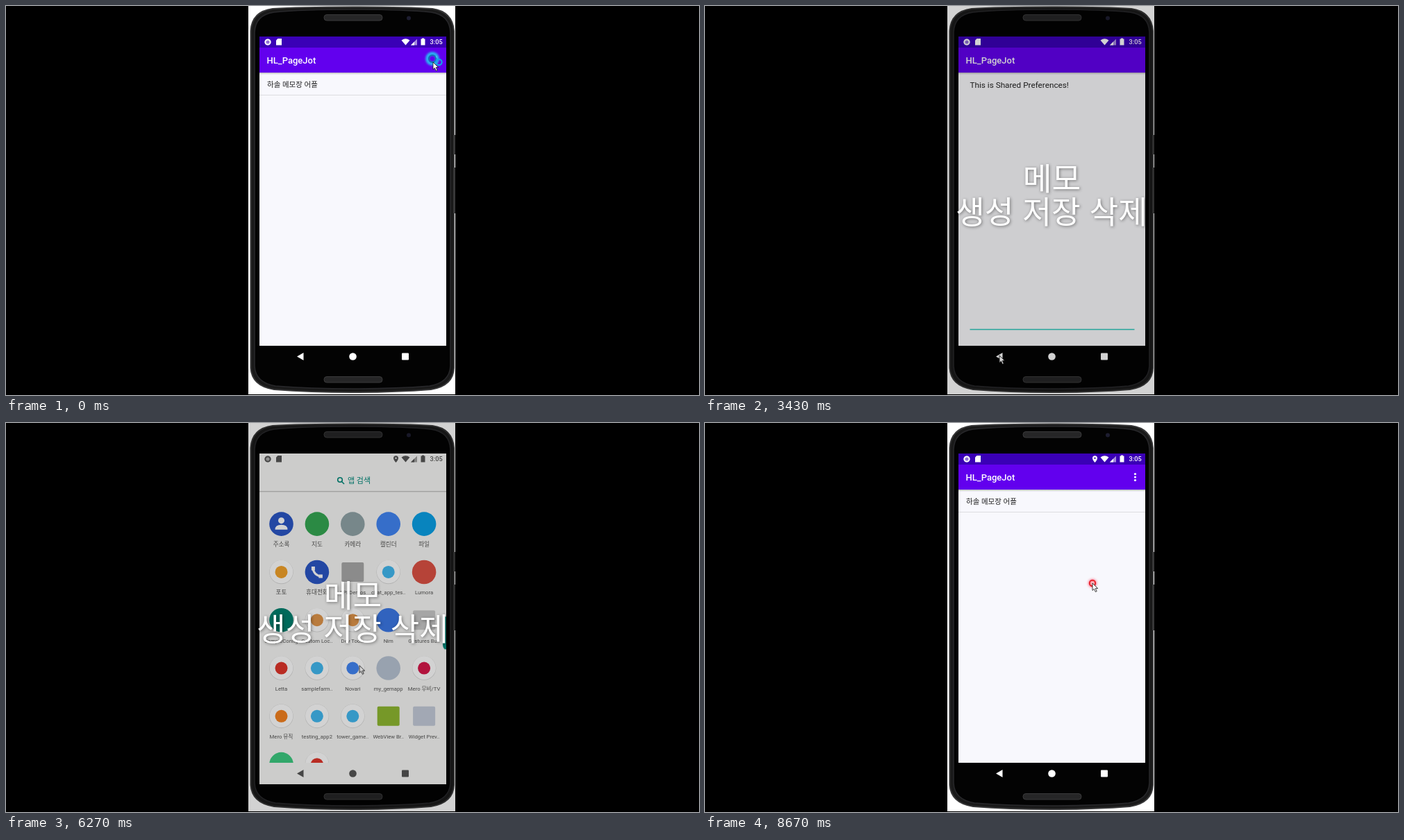
Recreate the animation shown at these times as an HTML page. Size 998 by 561 pixels, loop 8710 ms.

```html
<!DOCTYPE html>
<html lang="ko">
<head>
<meta charset="utf-8">
<title>Memo app demo</title>
<style>
  html, body { margin: 0; width: 100%; height: 100%; overflow: hidden; background: #000; }
  svg { display: block; width: 998px; height: 561px; }
  text { font-family: Roboto, "Noto Sans CJK KR", "Noto Sans CJK", sans-serif; white-space: pre; }
  .mid { text-anchor: middle; }
  .row { font-size: 10.5px; fill: #222; }
  .label { font-size: 7.7px; fill: #555; text-anchor: middle; }
  .label.ko { font-size: 8.6px; }
  .key { font-size: 18px; fill: #37474f; text-anchor: middle; }
  .hint { font-size: 7px; fill: #65737a; text-anchor: middle; }
  .word { font-size: 12px; fill: #5f6b70; text-anchor: middle; }
  .line { fill: none; stroke: currentColor; }
  #title { font-size: 45.4px; fill: #fff; text-anchor: middle; filter: drop-shadow(1px 1px 2px rgba(0,0,0,.45)); }
  #title text { font-family: "Noto Sans CJK KR", "Noto Sans CJK", sans-serif; font-weight: 300; }
  #ink { color: #fff; fill: currentColor; }
</style>
</head>
<body>
<svg viewBox="0 0 998 561">
  <defs>
    <clipPath id="screen"><rect x="365" y="44" width="269" height="477"/></clipPath>
    <clipPath id="below"><rect x="365" y="99" width="269" height="391"/></clipPath>
    <linearGradient id="sky" x1="0" y1="0" x2="0" y2="1">
      <stop offset="0" stop-color="#d393be"/>
      <stop offset=".25" stop-color="#e39bba"/>
      <stop offset=".45" stop-color="#d67ba6"/>
      <stop offset=".58" stop-color="#bd5a91"/>
      <stop offset=".69" stop-color="#8d3675"/>
      <stop offset=".79" stop-color="#562463"/>
      <stop offset="1" stop-color="#351d52"/>
    </linearGradient>
    <linearGradient id="drop" x1="0" y1="0" x2="0" y2="1">
      <stop offset="0" stop-opacity=".25"/>
      <stop offset="1" stop-opacity="0"/>
    </linearGradient>
    <filter id="blur" x="-1" y="-1" width="3" height="3"><feGaussianBlur stdDeviation="1.4"/></filter>
  </defs>

  <!-- phone -->
  <rect x="349" width="298" height="560" fill="#fff"/>
  <path d="M645 186h2v28h-2zM645 233h2v66h-2z" fill="#3a3a3a"/>
  <path d="M352.500 36Q354 8 384 4Q420 1.500 499 1.500T614 4Q643 8 645 36V522Q644 548 612 553Q560 557 499 557T386 553Q354 548 352.500 522Z" fill="#191919" stroke="#363637" stroke-width="2"/>
  <path d="M358 38Q359 13 386 9Q425 5 499 5T612 9Q639 13 640 38V519Q639 543 610 548Q560 552 499 552T388 548Q359 543 358 519Z" fill="#030303" stroke="#28282b" stroke-width="1.500"/>
  <g fill="#262627" stroke="#3a3a3b">
    <rect x="458" y="12.500" width="84" height="8.500" rx="4"/>
    <rect x="458" y="534.500" width="84" height="8.500" rx="4"/>
  </g>
  <circle cx="580" cy="17.500" r="3" fill="#1d1d30"/>

  <g clip-path="url(#screen)">
    <!-- list -->
    <rect x="365" y="44" width="269" height="446" fill="#f8f8fd"/>
    <rect x="365" y="44" width="269" height="16" fill="#3a00b6"/>
    <rect x="365" y="60" width="269" height="36" fill="#6200ee"/>
    <rect x="365" y="96" width="269" height="3" fill="url(#drop)"/>
    <text x="375.500" y="83" font-size="13" font-weight="500" fill="#fff">HL_PageJot</text>
    <g fill="#fff"><circle cx="619.500" cy="73.500" r="1.600"/><circle cx="619.500" cy="78" r="1.600"/><circle cx="619.500" cy="82.500" r="1.600"/></g>
    <text class="row" x="376" y="116.500">하솔 메모장 어플</text>
    <path d="M365 128.500h269" stroke="#dcdce0"/>
    <g id="second">
      <text class="row" x="376" y="149">This is Shared Preferences!</text>
      <path d="M365 160.500h269" stroke="#dcdce0"/>
    </g>

    <!-- editor -->
    <g id="editor">
      <rect x="600" y="62" width="34" height="33" fill="#6200ee"/>
      <rect x="365" y="99" width="269" height="391" fill="#fafafc"/>
      <path id="underline" d="M381.500 466.500H618.500" stroke="#2cc8ba" stroke-width="1.500"/>
      <text id="note" x="381.500" y="117.500" font-size="11.750" fill="#222"></text>
      <rect id="caret" y="105" width="1.600" height="16" fill="#12b5a6"/>
    </g>

    <!-- home -->
    <g id="home">
      <rect x="365" y="44" width="269" height="477" fill="url(#sky)"/>
      <path d="M365 434Q402 424 432 427Q462 431 480 437L634 446V521H365Z" fill="#2f1a50"/>
      <path d="M365 444Q430 438 500 441T634 436V521H365Z" fill="#352052"/>
      <rect x="365" y="432" width="269" height="89" fill="#fff" opacity=".06"/>
      <g opacity=".78">
        <rect x="371" y="83" width="51" height="37" rx="18.500" fill="#fff"/>
        <circle cx="396.500" cy="102" r="8" fill="#4285f4"/>
        <g fill="#fff" text-anchor="end">
          <text x="621" y="103.500" font-size="23" font-weight="300" opacity=".65">7월 2일</text>
          <text x="621" y="120" font-size="8" opacity=".35">2020년 목요일</text>
        </g>
        <g id="dock"></g>
        <text class="label ko" x="396.500" y="404" style="fill:#fff">지도</text>
      </g>
      <path d="M496 424l3.500-3.500 3.500 3.500" fill="none" stroke="#fff" stroke-width="1.300"/>
    </g>

    <!-- app drawer -->
    <g id="drawer">
      <rect x="365" y="44" width="269" height="477" fill="#f8f8f6"/>
      <g clip-path="url(#below)"><g id="apps"></g></g>
      <rect x="365" y="98" width="269" height="2.500" fill="url(#drop)"/>
      <g fill="none" stroke="#00897b" stroke-width="1.600"><circle cx="481" cy="82" r="3.300"/><path d="M483.500 84.500l3.500 3.500"/></g>
      <text x="492" y="87" font-size="11" fill="#00897b">앱 검색</text>
      <path id="thumb" d="M634 443h-2q-3 2-3 8v32q0 5 3 7h2z" fill="#00897b"/>
    </g>

    <rect id="ripple" x="540" y="490" width="70" height="31" rx="15.500" fill="#fff"/>

    <!-- status and navigation icons -->
    <g id="ink">
      <circle class="line" cx="377" cy="52" r="3.600" stroke-width="2"/>
      <circle cx="377" cy="52" r="4.500" opacity=".45"/>
      <path d="M391.500 47h5.500v9.500h-8v-7z"/>
      <path id="pin" d="M561.500 57q-3.500-4-3.500-6.300a3.500 3.500 0 0 1 7 0q0 2.300-3.500 6.300zm0-7.600a1.200 1.200 0 1 0 .01 0z" fill-rule="evenodd"/>
      <path d="M569.500 49.500q6-4.500 12 0l-6 7z"/>
      <path d="M592 47.500v9h-9z" opacity=".55"/><path d="M588 51.500v5h-5z"/>
      <path d="M599 46.500h3v1h1.500v9h-6v-9h1.500z"/>
      <text x="610.500" y="55.300" font-size="9.200" font-weight="500">3:05</text>
      <path d="M428.500 500v11l-9.500-5.500z"/>
      <circle cx="499.500" cy="505.500" r="5.300"/>
      <rect x="570" y="500.500" width="10" height="10" rx="1"/>
    </g>

    <!-- keyboard -->
    <g id="keyboard">
      <rect x="417" y="498" width="14" height="15"/>
      <path d="M418.500 501h11l-5.500 9.500z" fill="#fff"/>
      <rect x="608" y="501" width="13" height="9" rx="1" fill="#fff"/>
      <path d="M610 503.500h9M610 505.500h9" stroke="#000" stroke-dasharray="1 1"/><path d="M612 508h5" stroke="#000"/>
      <rect x="365" y="305" width="269" height="185" fill="#eceff1"/>
      <rect x="365" y="305" width="269" height="28" fill="#e2e6e9"/>
      <path d="M460.500 313v15M538.500 313v15" stroke="#cbd1d4"/>
      <circle cx="372" cy="320.500" r="7" fill="#f7f8f9"/>
      <g color="#546168">
        <path class="line" d="M370.500 317l3.500 3.500-3.500 3.500" stroke-width="1.300"/>
        <rect x="619.300" y="315" width="3.600" height="7" rx="1.800" fill="currentColor"/>
        <path class="line" d="M617.300 320q0 4 3.800 4t3.800-4M621 324v3"/>
        <path d="M386 423l7.500 7.500h-4v5h-7v-5h-4zM383 438h6v1.500h-6z" fill="currentColor"/>
        <path d="M604.500 429.500l4.500-6h11v12h-11z" fill="currentColor"/>
        <path d="M611 426.500l6 6m0-6l-6 6" stroke="#eceff1" stroke-width="1.300"/>
        <circle class="line" cx="446" cy="467" r="6" stroke-width="1.300"/>
        <path class="line" d="M443 469q3 3 6 0M443.500 464.500v2M448.500 464.500v2" stroke-width="1.200"/>
      </g>
      <text class="key" x="386" y="471.500" style="font-size:11.500px">?123</text>
      <text class="key" x="419" y="471">,</text>
      <text class="key" x="579" y="471">.</text>
      <rect x="466" y="459" width="93.500" height="17" rx="1" fill="#c2c8cb"/>
      <text class="mid" x="512.500" y="470.500" font-size="8.500" fill="#5f6b70">English</text>
      <circle cx="612.500" cy="467.500" r="11.500" fill="#2fb5a0"/>
      <path d="M618 463.500v4.500h-10.500m3-3l-3 3 3 3" fill="none" stroke="#fff" stroke-width="1.400"/>
    </g>
  </g>

  <!-- pointer, tip at 0,0 -->
  <g id="pointer">
    <g id="press">
      <circle r="7.500" fill="none" stroke="#22c3f2" stroke-width="4.500" filter="url(#blur)"/>
      <circle r="5" fill="none" stroke="#1273b8" stroke-width="2"/>
    </g>
    <g id="release">
      <circle r="4.600" fill="#f33" fill-opacity=".25" stroke="#f03" stroke-opacity=".35" stroke-width="4" filter="url(#blur)"/>
      <circle r="4.200" fill="none" stroke="#e8242c" stroke-width="2"/>
    </g>
    <circle id="busy" cx="8.500" cy="0" r="4.200" fill="none" stroke="#14a0e8" stroke-width="2.200"/>
    <path d="M0 0v10.500l2.400-2.200 1.900 4.200 1.900-.8-1.900-4.100h3.400z" fill="#fff" stroke="#111" stroke-width=".8"/>
  </g>

  <rect id="shade" width="998" height="561" opacity="0"/>
  <g id="title" opacity="0">
    <text x="499.500" y="266">메모</text>
    <text x="499" y="314">생성 저장 삭제</text>
  </g>
</svg>

<script>
const LOOP = 8710;
const $ = id => document.getElementById(id);

// Keys are [ms, properties]; the first and last hold to the ends of the loop.
function play(id, keys, easing = 'linear') {
  const all = [[0, keys[0][1]], ...keys, [LOOP, keys[keys.length - 1][1]]];
  $(id).animate(all.map(([ms, props]) => ({ ...props, offset: ms / LOOP, easing })),
    { duration: LOOP, iterations: Infinity });
}

const fade = (id, keys) => play(id, keys.map(([ms, opacity]) => [ms, { opacity }]));
const show = (id, from, to) => fade(id, [[from, 0], [from, 1], [to, 1], [to, 0]]);
const move = (id, keys, easing) =>
  play(id, keys.map(([ms, x, y]) => [ms, { transform: `translate(${x}px, ${y}px)` }]), easing);

// Keyboard letters
const text = (cls, x, y, s) => `<text class="${cls}" x="${x}" y="${y}">${s}</text>`;
const keyRow = (letters, x, y) => [...letters].map((c, i) => text('key', x + i * 26.6, y, c)).join('');
$('keyboard').insertAdjacentHTML('beforeend',
  keyRow('qwertyuiop', 379.5, 360.5) + keyRow('asdfghjkl', 393, 398) + keyRow('zxcvbnm', 419.5, 436) +
  [...'1234567890'].map((c, i) => text('hint', 389 + i * 26.6, 346.5, c)).join('') +
  text('word', 424, 325, 'a') + text('word', 498.5, 325, 'with') + text('word', 573, 325, 'this'));

// App icons
const shapes = {
  disc: c => `<circle r="17.300" fill="${c}"/>`,
  dot: c => `<circle r="17.300" fill="#d8d8d8"/><circle r="16.800" cy="-.4" fill="#fff"/><circle r="9" fill="${c}"/>`,
  box: c => `<rect x="-16" y="-14" width="32" height="28" rx="2" fill="${c}"/>`,
  phone: c => shapes.disc(c) + '<path d="M-6-6.500Q-5 5 6.500 6.500" fill="none" stroke="#fff" stroke-width="3"/><path d="M-8-8h5v5.500h-5zM2.500 3.500H8v5H2.500z" fill="#fff"/>',
  chat: c => shapes.disc(c) + `<path d="M-11-7H10V7H-7V-3z" fill="#fff"/><path d="M-4-3H7M-4 0H7M-4 3H4" stroke="${c}"/>`,
  person: c => shapes.disc(c) + '<circle cy="-5" r="4.500" fill="#fff"/><path d="M-9 8q0-7 9-7t9 7z" fill="#fff"/>'
};
const icon = (x, y, kind, c) => `<g transform="translate(${x} ${y})">${shapes[kind](c)}</g>`;
const blue = '#2a56c6', sky = '#42b8f0', red = '#e0352b', gold = '#f3a32b';

$('dock').innerHTML = icon(396.5, 371, 'disc', '#34a853') + icon(396.5, 464, 'phone', blue) +
  icon(448, 464, 'chat', blue) + icon(499.5, 464, 'dot', red) + icon(551, 464, 'disc', '#dd5144');

const apps = [
  ['주소록', 'person', blue], ['지도', 'disc', '#34a853'], ['카메라', 'disc', '#90a4a8'],
  ['캘린더', 'disc', '#4285f4'], ['파일', 'disc', '#0aa0e6'],
  ['포토', 'dot', gold], ['휴대전화', 'phone', blue], ['API Demos', 'box', '#a9a9a9'],
  ['chat_app_tes..', 'dot', sky], ['Lumora', 'disc', '#dd5144'],
  ['SampleConfig', 'disc', '#00806f'], ['Custom Loc..', 'dot', '#e0954a'], ['Dev Tools', 'dot', '#e0954a'],
  ['Nim', 'disc', '#3b78e7'], ['Gestures Bu..', 'box', '#c9c9c9'],
  ['Letta', 'dot', red], ['samplefarm..', 'dot', sky], ['Novari', 'dot', '#4285f4'],
  ['my_gemapp', 'disc', '#b9c4d4'], ['Mero 무비/TV', 'dot', '#d8174a'],
  ['Mero 뮤직', 'dot', '#f58220'], ['testing_app2', 'dot', sky], ['tower_game..', 'dot', sky],
  ['WebView Br..', 'box', '#8fb831'], ['Widget Prev..', 'box', '#c4ccda'],
  ['HL_PageJot', 'disc', '#3ccb80'], ['ClipDen', 'dot', red]
];
$('apps').innerHTML = apps.map(([name, kind, c], i) => {
  const x = 396.5 + i % 5 * 51.4, y = 101 + Math.floor(i / 5) * 69.3;
  return icon(x, y, kind, c) + text(/^[가-힣]/.test(name) ? 'label ko' : 'label', x, y + 32.3, name);
}).join('');

// Screens
show('editor', 600, 3550);
show('keyboard', 1200, 3250);
fade('underline', [[1200, 1], [1200, 0], [3250, 0], [3250, 1]]);
show('second', 3550, 8200);
show('home', 4850, 6000);
show('drawer', 5700, 7150);
fade('pin', [[4850, 0], [4850, 1]]);
move('drawer', [[5700, 0, 477], [5980, 0, 0]], 'ease-out');
move('apps', [[6150, 0, 90], [6500, 0, 0]], 'ease-out');
move('thumb', [[6150, 0, -330], [6500, 0, 0]], 'ease-out');
play('ink', [[5850, { color: '#fff' }], [5850, { color: '#555' }], [7150, { color: '#555' }], [7150, { color: '#fff' }]]);
fade('ripple', [[4340, 0], [4420, .2], [4560, .2], [4750, 0]]);

// Pointer
move('pointer', [[0, 615, 81], [250, 619, 81], [550, 529, 75], [2850, 529, 75], [3150, 424, 504], [3600, 424, 504],
  [4300, 552, 507], [4650, 552, 507], [5300, 509, 451], [5700, 509, 451], [6000, 509, 300], [6150, 509, 380],
  [6450, 509, 290], [6800, 407, 460], [7150, 407, 460], [7550, 450, 146], [7950, 450, 146], [8350, 558, 231]], 'ease-in-out');
fade('press', [[60, 1], [200, 0], [3180, 0], [3220, 1], [3330, 0], [3460, 0], [3500, 1], [3620, 0], [4330, 0],
  [4380, 1], [4500, 1], [4620, 0], [6900, 0], [6950, .55], [7000, .55], [7100, 0], [7600, 0], [7650, 1], [7900, 1], [7960, 0]]);
move('press', [[150, -1, -5], [400, 0, 0]]);
fade('release', [[600, 0], [680, .9], [850, .9], [980, 0], [2080, 0], [2140, 1], [2220, 1], [2330, 0],
  [5430, 0], [5500, 1], [5600, 1], [5700, 0], [8500, 0], [8580, 1]]);
move('release', [[900, -2, -6], [1100, 0, 0]]);
fade('busy', [[1000, 1], [1000, 0]]);

// Caption
fade('shade', [[100, 0], [600, .175], [8050, .175], [8550, 0]]);
fade('title', [[100, 0], [600, 1], [8050, 1], [8550, 0]]);

// Typing
const phrase = 'This is Shared Preferences!';
const started = performance.now();
function type() {
  const t = (performance.now() - started) % LOOP;
  const count = Math.min(phrase.length, Math.max(0, Math.floor((t - 1300) / 56)));
  $('note').textContent = phrase.slice(0, count);
  $('caret').setAttribute('x', 381.5 + $('note').getComputedTextLength());
  $('caret').setAttribute('opacity', t > 1200 && t < 3250 ? 1 : 0);
  requestAnimationFrame(type);
}
type();
</script>
</body>
</html>
```
